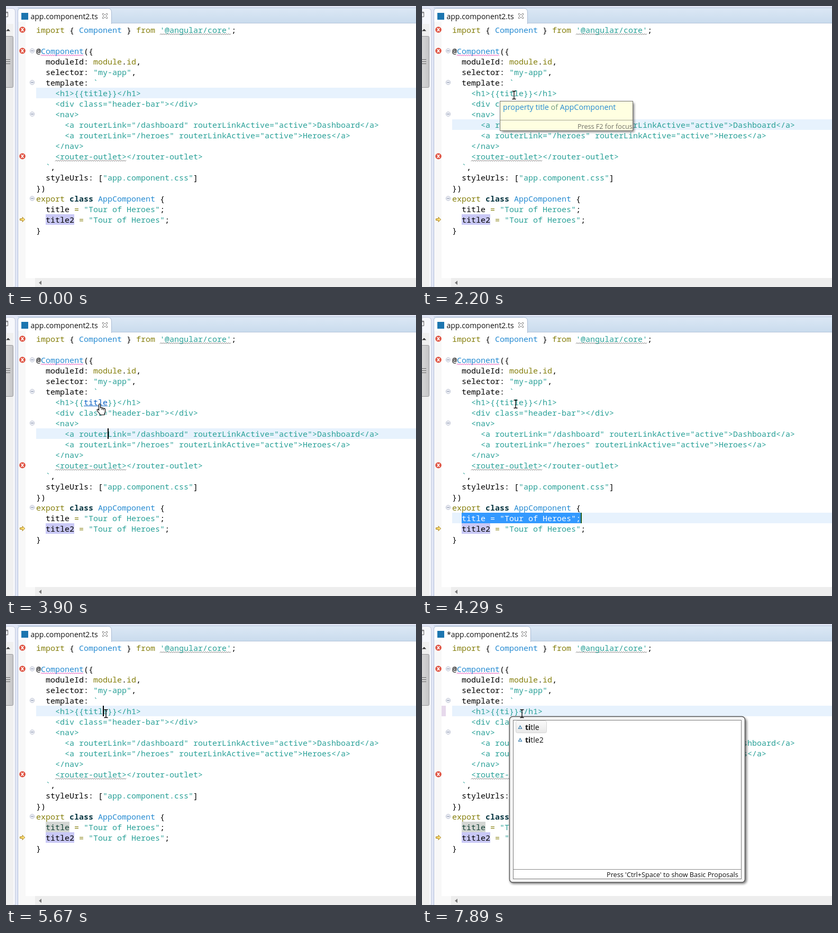
Write an HTML page that moves like this. It is 775 px wide and 533 px high and loops after 8000 ms.

```html
<!DOCTYPE html>
<html lang="en">
<head>
<meta charset="utf-8">
<title>Code editor</title>
<style>
html, body { margin: 0; width: 100%; height: 100%; overflow: hidden; background: #fff; }
svg { display: block; width: 775px; height: 533px; }
text { white-space: pre; }
.code { font: 15px "Noto Sans Mono", "DejaVu Sans Mono", monospace; }
.ui { font-family: "Open Sans", "Noto Sans", sans-serif; }
.k { fill: #000; }
.o { fill: #857f0c; }
.t { fill: #2aa198; }
.b { fill: #268bd2; }
.n { fill: #073642; font-weight: bold; }
.w { fill: #fff; }
.link { fill: #0a62c4; }
.occ { fill: #123f33; }
</style>
</head>
<body>
<svg viewBox="0 0 775 533">
  <defs>
    <linearGradient id="bar" x2="0" y2="1"><stop stop-color="#dce8f5"/><stop offset="1" stop-color="#c9dbed"/></linearGradient>
    <linearGradient id="thumb"><stop stop-color="#dcdcdc"/><stop offset="1" stop-color="#c4c4c6"/></linearGradient>
    <linearGradient id="item" x2="0" y2="1"><stop stop-color="#fafafa"/><stop offset="1" stop-color="#e8e8e8"/></linearGradient>
    <filter id="blur" x="-10%" y="-20%" width="120%" height="140%"><feGaussianBlur stdDeviation="2.2"/></filter>
    <g id="err">
      <circle r="5.8" fill="#df5140"/>
      <path d="M-2.3-3 2.3 3M2.3-3-2.3 3" stroke="#fff" stroke-width="1.7"/>
    </g>
    <g id="fold">
      <circle r="4.2" fill="#eef0f6" stroke="#b9bfd0"/>
      <path d="M-2.5 0H2.5" stroke="#6f7d98"/>
    </g>
  </defs>

  <rect width="775" height="533" fill="#e1e6f5"/>
  <path d="M0 4.5H11Q17.5 4.5 17.5 11V533H0Z" fill="#f7f8fc" stroke="#c3cadd"/>
  <path d="M0 11.500H3.500V20.500H0M0 13H3" fill="none" stroke="#666"/>
  <rect y="34" width="14" height="499" fill="#f0f0f0"/>
  <path d="M0 47.500 4 43.500 8 47.500Z" fill="#333"/>
  <rect x="-6" y="57.500" width="19.500" height="97" rx="2" fill="url(#thumb)" stroke="#98989a"/>
  <path d="M0 101.500H8M0 105.500H8M0 109.500H8" stroke="#666"/>

  <rect x="22" y="3" width="753" height="30" fill="url(#bar)"/>
  <path d="M22 3.500H775M200 32.500H775" stroke="#b3c4da"/>
  <rect x="23" y="33" width="752" height="500" fill="#fff"/>
  <path id="tab" fill="#fff" stroke="#a9bad3"/>
  <rect x="23" y="30" width="14" height="503" fill="#f8f8f8"/>
  <path d="M22.500 8V533" stroke="#b3c0dc"/>
  <rect x="29" y="13" width="13" height="13" fill="#1c76b0"/>
  <text id="name" class="ui" y="24.500" font-size="14" fill="#111"></text>
  <path id="close" d="M-4.500-4.500H-2.500L0-2 2.500-4.500H4.500V-2.500L2 0 4.500 2.500V4.500H2.500L0 2-2.500 4.500H-4.500V2.500L-2 0-4.500-2.500Z" fill="#fdfdfd" stroke="#777"/>
  <rect x="23" y="516" width="32" height="17" fill="#f8f8f8"/>
  <rect x="55" y="516" width="720" height="17" fill="#ededed"/>
  <path d="M67 521V529L62 525Z" fill="#777"/>

  <rect id="row" x="57" width="718" height="20" fill="#e7f2fd"/>
  <rect id="diff" x="37" y="155" width="8" height="20" fill="#e6d9ec"/>
  <rect id="occ" x="75" y="375" width="45" height="20" fill="#d3d6d3"/>
  <rect x="75" y="395" width="54" height="20" fill="#c9c8f6"/>
  <rect id="selLine" x="75" y="375" width="225" height="20" fill="#3399ff"/>
  <rect id="selWord" x="147" y="155" width="45" height="20" fill="#3399ff"/>
  <g id="marks"></g>
  <g id="code" class="code"></g>
  <path id="under" d="M147 172.500H192" stroke="#0a62c4"/>
  <rect id="caret" width="2" height="20"/>

  <g id="tip">
    <rect id="tipShade" x="151" y="184" width="250" height="55" fill="#000" opacity=".5" filter="url(#blur)"/>
    <rect x="147.500" y="180.500" width="251" height="56" fill="#ffffe1" stroke="#6e6e6e"/>
    <g id="tipText" class="ui">
      <path d="M148 216.500H398" stroke="#a5a593"/>
      <text x="153" y="197" font-size="14.300" class="b">property title <tspan fill="#6f9a80">of</tspan> AppComponent</text>
      <text x="294" y="233" font-size="12.600" fill="#707068">Press F2 for focus</text>
    </g>
  </g>

  <g id="popup" class="ui">
    <rect x="166" y="178" width="448" height="315" rx="7" fill="#000" opacity=".5" filter="url(#blur)"/>
    <rect x="165.500" y="175.500" width="445" height="314.500" rx="6" fill="#f5f5f5" stroke="#555" stroke-width="1.400"/>
    <rect x="172.500" y="182.500" width="431" height="301" fill="#fff" stroke="#7c7c7c"/>
    <path d="M173 465.500H603" stroke="#8a8a8a"/>
    <rect x="177.500" y="183.500" width="58" height="23" rx="3" fill="url(#item)" stroke="#d6d6d6"/>
    <path d="M182.500 198.500H188.500L185.500 193ZM182.500 222.500H188.500L185.500 217Z" fill="#e4f1fa" stroke="#3a7ca8" stroke-width="1.200"/>
    <g font-size="14" fill="#111">
      <text x="195" y="201"><tspan font-weight="bold">ti</tspan>tle</text>
      <text x="195" y="225"><tspan font-weight="bold">ti</tspan>tle2</text>
    </g>
    <text x="349" y="480" font-size="12.700" fill="#111">Press 'Ctrl+Space' to show Basic Proposals</text>
  </g>

  <path id="beam" d="M-3.500-7.500H-1L0-6.500 1-7.500H3.500M0-6.500V6.500M-3.500 7.500H-1L0 6.500 1 7.500H3.500" fill="none" stroke="#000" stroke-width="1.300"/>
  <path id="hand" d="M-1.500 1.500Q-1.500-.5 0-.5T1.500 1.500V7Q3.500 5.500 4.500 7.500 6.500 6.500 7.500 8.500 10 7.500 10.500 10V14Q10.500 16.500 9 18V20.500H.5V18.500Q-2 16.500-4.500 12.500-5.500 10.500-4 10T-1.500 12ZM4.500 8V11M7.500 9V11.500" fill="#fff" stroke="#000" stroke-width="1.200"/>
</svg>
<script>
const $ = id => document.getElementById(id);
const LOOP = 8000, CH = 9, LEFT = 57;
const NS = "http://www.w3.org/2000/svg";
const rowTop = r => 35 + 20 * r;

function add(parent, tag, attrs, text) {
  const el = document.createElementNS(NS, tag);
  for (const k in attrs) el.setAttribute(k, attrs[k]);
  if (text !== undefined) el.textContent = text;
  return parent.appendChild(el);
}

// One line of code: row, column, then pairs of class and text.
function line(row, col, ...parts) {
  const el = add($("code"), "text", { x: LEFT + col * CH, y: rowTop(row) + 16 });
  for (let i = 0; i < parts.length; i += 2) add(el, "tspan", { class: parts[i] }, parts[i + 1]);
  return el;
}

line(0, 0, "o", "import", "k", " { ", "b", "Component", "k", " } ", "o", "from ", "t", "'@angular/core'", "k", ";");
line(2, 0, "k", "@", "b", "Component", "k", "({");
line(3, 2, "k", "moduleId: ", "o", "module", "k", ".", "o", "id", "k", ",");
line(4, 2, "k", "selector: ", "t", '"my-app"', "k", ",");
line(5, 2, "k", "template: ", "t", "`");
const heading = line(6, 4, "t", "<h1>{{", "t", "title", "t", "}}</h1>");
line(7, 4, "t", '<div class="header-bar"></div>');
line(8, 4, "t", "<nav>");
line(9, 6, "t", '<a routerLink="/dashboard" routerLinkActive="active">Dashboard</a>');
line(10, 6, "t", '<a routerLink="/heroes" routerLinkActive="active">Heroes</a>');
line(11, 4, "t", "</nav>");
line(12, 4, "t", "<router-outlet></router-outlet>");
line(13, 2, "t", "`", "k", ",");
line(14, 2, "k", "styleUrls: [", "t", '"app.component.css"', "k", "]");
line(15, 0, "k", "})");
line(16, 0, "o", "export ", "n", "class ", "b", "AppComponent", "k", " {");
const field = ["k", "title", "o", " = ", "t", '"Tour of Heroes"', "k", ";"];
const plain = line(17, 2, ...field);
const picked = line(17, 2, "w", 'title = "Tour of Heroes";');
line(18, 2, "k", "title2", ...field.slice(2));
line(19, 0, "k", "}");

function wave(row, col, len, color) {
  let d = "";
  for (let i = 0; i <= len * CH; i += 2)
    d += (i ? "L" : "M") + (LEFT + col * CH + i) + " " + (rowTop(row) + (i % 4 ? 17.5 : 19.5));
  add($("marks"), "path", { d, fill: "none", stroke: color });
}
wave(0, 26, 15, "#777");
wave(2, 1, 9, "#e23bb0");
wave(12, 4, 15, "#777");

const mark = (id, x, row) =>
  add($("marks"), "use", { href: "#" + id, transform: `translate(${x} ${rowTop(row) + 10})` });
[0, 2, 12].forEach(r => mark("err", 31, r));
[2, 5, 8, 16].forEach(r => mark("fold", 49.5, r));
add($("marks"), "path", { d: "M26.5 403.5H31V400.5L35.500 405 31 409.500V406.500H26.500Z", fill: "#ffe27a", stroke: "#a67c14" });

// Tables of steps: time, then the values held from that time on.
const mouse = [
  [0, 0, 0, ""], [290, 342, 328, "beam"], [390, 250, 253, "beam"], [600, 212, 236, "beam"],
  [680, 196, 227, "beam"], [980, 195, 222, "beam"], [1060, 192, 209, "beam"], [1140, 188, 194, "beam"],
  [1210, 183, 182, "beam"], [1290, 180, 174, "beam"], [1360, 179, 172, "beam"], [1440, 177, 171, "beam"],
  [1510, 175, 170, "beam"], [1590, 174, 169, "beam"], [3510, 174, 169, "hand"], [3670, 175, 169, "hand"],
  [3750, 177, 169, "hand"], [4290, 177, 169, "beam"], [5210, 179, 169, "beam"], [5290, 182, 169, "beam"],
  [5360, 185, 170, "beam"], [5440, 187, 170, "beam"], [5510, 189, 170, "beam"],
  [7200, 189, 170, ""], [7440, 189, 170, "beam"]
];
const current = [[0, 6], [680, 9], [4210, 17], [5670, 6]];
const caret = [
  [0, 0], [750, 192], [1290, 0], [1820, 192], [2360, 0], [2860, 192], [3360, 0], [3900, 192],
  [4210, 300], [4820, 0], [5360, 300], [5670, 183], [5890, 192], [6350, 0],
  [6740, 147], [7200, 156], [7350, 165], [7890, 0]
];
const word = [[0, "title"], [6740, ""], [7200, "t"], [7350, "ti"]];

const at = (table, t) => table.filter(s => s[0] <= t).pop();
const show = (el, on) => { el.style.display = on ? "" : "none"; };
const within = (t, a, b) => t >= a && t < b;

function draw(t) {
  const dirty = t >= 6740, right = dirty ? 205.5 : 199.5;
  $("tab").setAttribute("d", `M22.5 34V10Q22.5 4.500 28 4.500H${right - 7}Q${right} 4.500 ${right} 12V34`);
  $("name").textContent = dirty ? "*app.component2.ts" : "app.component2.ts";
  $("name").setAttribute("x", dirty ? 47 : 46.5);
  $("close").setAttribute("transform", `translate(${dirty ? 193 : 187} 19)`);
  show($("diff"), dirty);

  const row = at(current, t)[1];
  $("row").setAttribute("y", rowTop(row));
  const cx = at(caret, t)[1];
  show($("caret"), cx);
  $("caret").setAttribute("x", cx);
  $("caret").setAttribute("y", rowTop(row));
  $("caret").setAttribute("fill", row === 17 ? "#1c5a1c" : "#000");

  const link = within(t, 3510, 4210), wordSel = within(t, 5890, 6740), lineSel = row === 17;
  const span = heading.children[1];
  span.textContent = at(word, t)[1];
  span.setAttribute("class", link ? "link" : wordSel ? "w" : "t");
  show($("under"), link);
  show($("selWord"), wordSel);
  show($("selLine"), lineSel);
  show(picked, lineSel);
  show(plain, !lineSel);
  show($("occ"), t >= 5670);
  plain.children[0].setAttribute("class", t >= 5670 ? "occ" : "k");

  show($("tip"), within(t, 2130, 3120));
  show($("tipShade"), t >= 2200);
  show($("tipText"), t >= 2200);
  show($("popup"), t >= 7890);

  const [, mx, my, kind] = at(mouse, t);
  for (const id of ["beam", "hand"]) {
    show($(id), kind === id);
    $(id).setAttribute("transform", `translate(${mx} ${my})`);
  }
}

const start = performance.now();
function tick() {
  draw((performance.now() - start) % LOOP);
  requestAnimationFrame(tick);
}
tick();
</script>
</body>
</html>
```
